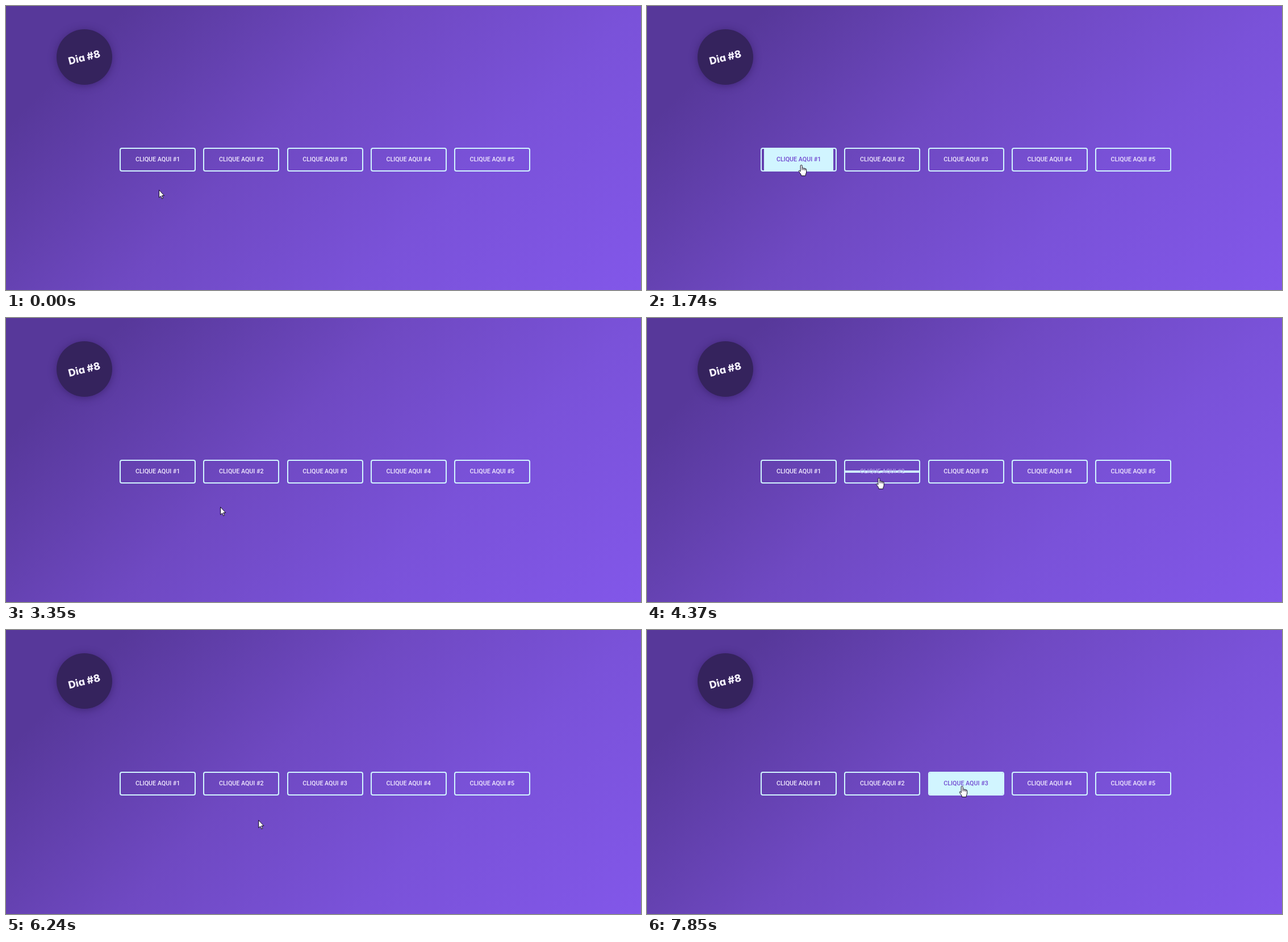
Write an HTML page that moves like this. It is 1118 px wide and 501 px high and loops after 8 s.

```html
<!DOCTYPE html>
<html lang="pt">
<head>
<meta charset="utf-8">
<title>Botões</title>
<style>
  :root { --ice: #d1f5ff; --label: #f2ecff; --violet: #7048d0; --loop: 8s infinite; }
  html, body { margin: 0; width: 100%; height: 100%; overflow: hidden; }
  body {
    position: relative;
    background: linear-gradient(135deg, #57389a 13%, #6f49c2 43%, #7a52d9 69%, #8257e9);
  }
  .badge {
    position: absolute; left: 89px; top: 41px; width: 98px; height: 98px;
    border-radius: 50%; background: #35235d; box-shadow: 0 2px 14px rgba(40, 20, 80, .5);
    display: grid; place-items: center;
  }
  .badge span {
    rotate: -14deg; color: #f6f2ff; white-space: nowrap;
    font: 800 18px Inter, sans-serif; font-feature-settings: "cv11";
  }
  .button {
    position: absolute; top: 250px; left: calc(200.2px + var(--i) * 147.15px);
    box-sizing: border-box; width: 134px; height: 42px; overflow: hidden;
    border: 2px solid var(--ice); border-radius: 4px;
  }
  .button i { position: absolute; inset: 0; background: var(--ice); scale: 0; }
  .button span {
    position: absolute; inset: 0; color: var(--label); text-align: center;
    font: 500 10.7px/38px Roboto, sans-serif; white-space: nowrap;
  }
  .one i { animation: fill-one var(--loop) ease; }
  .one span { animation: text-one var(--loop) ease; }
  .two i { animation: fill-two var(--loop) ease; }
  .two span { animation: text-two var(--loop) ease; }
  .three i { inset: -140% 0; rotate: 45deg; animation: fill-three var(--loop) ease; }
  .three span { animation: text-three var(--loop) ease; }

  @keyframes fill-one {
    0%, 17.375%, 35.625%, 100% { scale: 0 1; }
    23.625%, 29.375% { scale: 1 1; }
  }
  @keyframes text-one {
    0%, 17.375%, 32.5%, 100% { color: var(--label); }
    20.5%, 29.375% { color: var(--violet); }
  }
  @keyframes fill-two {
    0%, 53.725%, 74.225%, 100% { scale: 1 0; }
    61.725%, 66.225% { scale: 1 1; }
  }
  @keyframes text-two {
    0%, 53.725%, 68.9%, 100% { color: var(--label); }
    56.85%, 66.05% { color: var(--violet); }
  }
  @keyframes fill-three {
    0%, 91.875% { scale: 1 0; }
    99.375%, 100% { scale: 1 1; }
  }
  @keyframes text-three {
    0%, 91.875% { color: var(--label); }
    95%, 100% { color: var(--violet); }
  }

  .cursor {
    position: absolute; left: 0; top: 0; overflow: visible;
    fill: #fff; stroke: #120c22; stroke-linejoin: round;
    animation: travel var(--loop) linear;
  }
  .arrow { animation: arrow var(--loop) step-end; }
  .hand { animation: hand var(--loop) step-end; }
  @keyframes arrow {
    0%, 29.375%, 66.05% { opacity: 1; }
    17.375%, 53.725%, 91.875%, 100% { opacity: 0; }
  }
  @keyframes hand {
    0%, 29.375%, 66.05% { opacity: 0; }
    17.375%, 53.725%, 91.875%, 100% { opacity: 1; }
  }
  @keyframes travel {
    0%, 12.5% { translate: 269px 324px; }
    17.375% { translate: 272px 291px; }
    20%, 27.3% { translate: 272px 280px; }
    29.375% { translate: 274px 293px; }
    33.5% { translate: 278px 322px; }
    37.5%, 37.8% { translate: 280px 335px; }
    40% { translate: 334px 336px; }
    41.875% { translate: 377px 333px; }
    45% { translate: 397px 330px; }
    47.75%, 48.8% { translate: 405px 328px; }
    53.725% { translate: 408px 291px; }
    54.625% { translate: 408.5px 282px; }
    57%, 64.2% { translate: 409px 278px; }
    66.05% { translate: 411px 293px; }
    67.6% { translate: 414px 324px; }
    69.4% { translate: 415px 327px; }
    74% { translate: 425px 333px; }
    78% { translate: 444px 335px; }
    79.75% { translate: 473px 332px; }
    83% { translate: 526px 327px; }
    86.75%, 89.3% { translate: 554px 324px; }
    91.875% { translate: 554px 291px; }
    95% { translate: 555px 277px; }
    98.125%, 100% { translate: 555px 275px; }
  }
</style>
</head>
<body>
  <div class="badge"><span>Dia #8</span></div>
  <div class="button one" style="--i:0"><i></i><span>CLIQUE AQUI #1</span></div>
  <div class="button two" style="--i:1"><i></i><span>CLIQUE AQUI #2</span></div>
  <div class="button three" style="--i:2"><i></i><span>CLIQUE AQUI #3</span></div>
  <div class="button" style="--i:3"><span>CLIQUE AQUI #4</span></div>
  <div class="button" style="--i:4"><span>CLIQUE AQUI #5</span></div>
  <svg class="cursor" width="1" height="1">
    <path class="arrow" d="M.5 .5V14L3.6 11.2L5.7 16L7.6 15.2L5.6 10.5H9.6Z"/>
    <g class="hand">
      <path d="M-1.8 12V2Q-1.8 .5 -.3 .5Q1.2 .5 1.2 2V6Q2.6 4.8 3.8 6.4Q5.2 5.4 6.2 7Q8.6 6.4 8.6 9V13Q8.6 15 7.2 17V19.5H-.6V17.6L-4.6 11.8Q-5 10 -3.6 10Z"/>
      <path fill="none" d="M1.2 6V9.5M3.8 6.4V9.5M6.2 7V10"/>
    </g>
  </svg>
</body>
</html>
```
